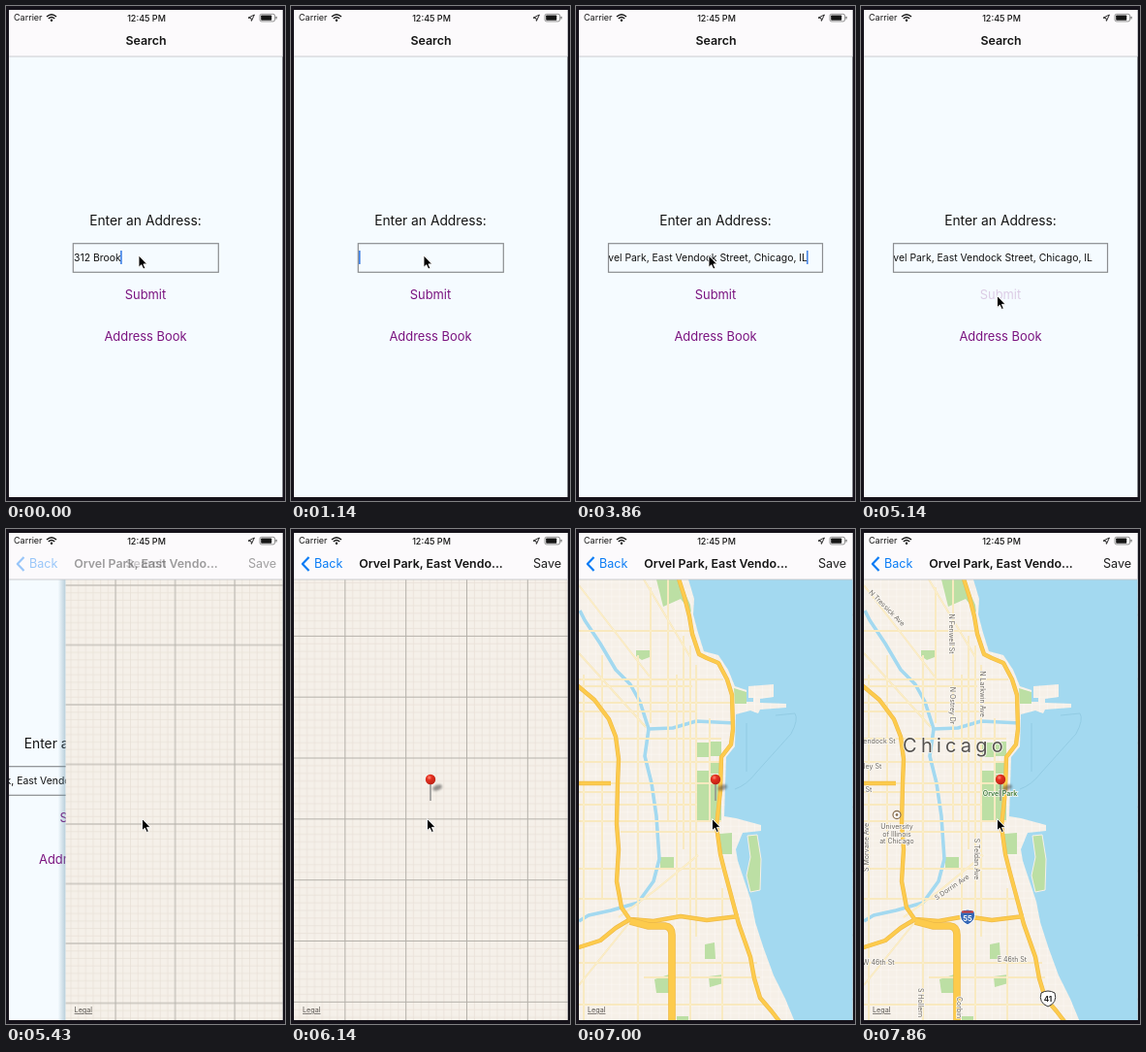
Animation of 288 by 510 pixels, one loop 8000 ms. Source, as an HTML page:

```html
<!DOCTYPE html>
<html lang="en">
<head>
<meta charset="utf-8">
<title>Address search</title>
<style>
html, body { margin: 0; width: 100%; height: 100%; overflow: hidden; background: #15121a; }
svg { display: block; width: 100%; height: 100%; font-family: Inter, Roboto, sans-serif; }
text { white-space: pre; }
path { fill: none; stroke-linejoin: round; }
.mid { text-anchor: middle; }
.title { font-size: 12.4px; font-weight: 600; fill: #141414; }
.bar { font-size: 12.6px; }
.link { font-size: 12.9px; fill: #7b1480; }
.field { font-size: 10.4px; fill: #111; }
.land { fill: #f6f0e8; }
.park { fill: #bcdfa4; }
.river { stroke: #a3d9f0; stroke-width: 3.6; }
.edge { stroke: #f5e3b4; stroke-width: 1.9; }
.street { stroke: #fdf0cc; stroke-width: 1.1; }
.casing { stroke: #eeba48; stroke-width: 4.4; }
.highway { stroke: #fdcb4c; stroke-width: 3.2; }
.wide.casing { stroke-width: 7.6; }
.wide.highway { stroke-width: 6.2; }
.label { font-size: 7px; fill: #6c6862; paint-order: stroke; stroke: #fbf8f3; stroke-width: 1.6px; text-anchor: middle; }
</style>
</head>
<body>
<svg viewBox="0 0 288 510" preserveAspectRatio="none">
  <defs>
    <clipPath id="screen"><rect x="3" y="4" width="282.5" height="502"/></clipPath>
    <clipPath id="fieldClip"><rect x="34" y="240" width="220" height="40"/></clipPath>
    <clipPath id="landClip"><use href="#coast"/></clipPath>
    <pattern id="grid" width="64" height="64" patternUnits="userSpaceOnUse">
      <rect width="64" height="64" fill="#f5f0e9"/>
      <path id="fine" stroke="#e8e0d7" stroke-width=".8"/>
      <path d="M32 0V64M0 32H64" stroke="#b3afa9"/>
    </pattern>
    <pattern id="blocks" width="8.2" height="7.4" patternUnits="userSpaceOnUse">
      <path d="M0 3H8.2M4 0V7.4" stroke="#fffdfa" stroke-width=".7" opacity=".5"/>
    </pattern>
    <linearGradient id="shade">
      <stop offset="0" stop-color="#5a88a0" stop-opacity="0"/>
      <stop offset="1" stop-color="#5a88a0" stop-opacity=".4"/>
    </linearGradient>
    <radialGradient id="red" cx=".38" cy=".32" r=".7">
      <stop offset="0" stop-color="#ff8a78"/><stop offset=".35" stop-color="#e5301f"/><stop offset="1" stop-color="#bb2015"/>
    </radialGradient>
    <filter id="soft" x="-50%" y="-50%" width="200%" height="200%"><feGaussianBlur stdDeviation="1.1"/></filter>
  </defs>

  <g clip-path="url(#screen)">
    <rect width="288" height="510" fill="#f5fbff"/>

    <g id="form">
      <text class="mid" x="144" y="226" font-size="13.8" fill="#141414">Enter an Address:</text>
      <rect id="box" y="244.7" height="29.6" fill="none" stroke="#8b8d90" stroke-width="1.2"/>
      <g clip-path="url(#fieldClip)"><text id="entry" class="field" y="263"></text></g>
      <rect id="caret" y="252" width="1.6" height="14" fill="#3c7fe6"/>
      <text id="submit" class="link mid" x="144" y="301.5">Submit</text>
      <text class="link mid" x="144" y="345">Address Book</text>
    </g>

    <g id="page">
      <rect x="-5" y="52" width="8" height="456" fill="url(#shade)"/>
      <rect x="3" y="52" width="283" height="456" fill="url(#grid)"/>
      <g id="map">
        <rect x="3" y="52" width="283" height="456" fill="#a3d9f0"/>
        <path d="M164 268Q176 264 186 251L222 211Q230 196 226 190L206 192M176 200V250" stroke="#8fc8e0" stroke-width=".8"/>
        <path id="coast" class="land" d="M3 52H116L122 72L121 88L126 107L132 126L147 130L157 145L164 162L176 166V178H183V174H178V162L204 160V173L190 175V179L217 180V184L190 186L188 190L180 187L165 191L164 224L155 235L153 296L165 298L191 305V311L172 313L165 330L167 342L172 357L181 384L185 405L193 430L204 460L216 484L226 508H3Z"/>
        <path class="park" stroke="#f6f0e8" d="M177 316L187 315L191 340L190 372L180 374L176 357L180 338Z"/>
        <g clip-path="url(#landClip)">
          <rect x="3" y="52" width="226" height="456" fill="url(#blocks)"/>
          <path class="park" d="M83 52H106L118 78L119 86L108 72L90 80ZM62 125H76V132L68 135L62 131ZM125 220H137V235H125ZM139 219H150V234H139ZM125 249H137V301H125ZM139 241H148V252H139ZM139 253H150V300H139ZM148 314L161 313V335H150ZM87 338H101V350H87ZM133 428L143 426L144 443H133ZM137 461L152 459V468L138 472ZM81 464L96 459V478H83ZM163 164L176 168V180H164ZM104 502H116V508H104Z"/>
          <path class="river" d="M4 84L9 94L25 118L41 145L56 160L66 178L75 206L100 205L124 198L164 200M75 206L71 234L78 262L83 296L86 340L80 363L64 385L36 393L13 398L3 404"/>
          <g id="streets"></g>
          <g id="roads"></g>
          <g id="trunk"></g>
        </g>
        <g id="labels"></g>
      </g>
      <text x="12" y="498" font-size="7.2" fill="#55524e" text-decoration="underline">Legal</text>
      <g id="pin">
        <ellipse cx="151" cy="266.5" rx="5" ry="2.8" fill="#444" opacity=".55" transform="rotate(-22 151 266)" filter="url(#soft)"/>
        <path d="M144 262V280" stroke="#8a8a8a" stroke-width="1.4"/>
        <circle cx="144" cy="258" r="5.2" fill="url(#red)"/>
      </g>
    </g>

    <rect width="288" height="52" fill="#fcfafc"/>
    <path d="M0 52H288" stroke="#c4c6c9" stroke-width=".9"/>
    <g fill="#151515" font-size="9">
      <text x="8" y="15.3">Carrier</text>
      <text class="mid" x="145" y="15.5" font-weight="500">12:45 PM</text>
      <path d="M42 11Q47 6.4 52 11M43.8 13Q47 10 50.2 13" stroke="#151515" stroke-width="1.5"/>
      <circle cx="47" cy="14.7" r="1.2"/>
      <path d="M250 12.2L256.4 9L253.4 15.4L253 12.4Z" stroke="#151515" stroke-width=".9"/>
      <rect x="262" y="8.3" width="15.6" height="7.6" rx="1.8" fill="none" stroke="#777" stroke-width=".8"/>
      <rect x="263.2" y="9.5" width="11" height="5.2" rx=".7"/>
      <rect x="278.4" y="10.7" width="1.2" height="2.8" rx=".5" fill="#777"/>
    </g>
    <text id="oldTitle" class="title mid" x="144.5" y="40">Search</text>
    <g id="newBar">
      <path d="M18.5 29L11.8 36L18.5 43" stroke="#0a7cf5" stroke-width="2.2"/>
      <text class="bar" x="24" y="40.3" fill="#0a7cf5">Back</text>
      <text class="title mid" x="144.5" y="40">Orvel Park, East Vendo...</text>
      <text class="bar" x="250" y="40.3" fill="#1c1c1c">Save</text>
    </g>
  </g>
  <path id="mouse" d="M0 0V12.2L2.8 9.7L4.8 14L6.8 13.1L4.9 8.9H8.6Z" style="fill:#000" stroke="#fff" stroke-width=".9"/>
</svg>

<script>
const $ = id => document.getElementById(id);
const set = (id, attrs) => { for (const k in attrs) $(id).setAttribute(k, attrs[k]); };
const ramp = (t, from, to) => Math.min(1, Math.max(0, (t - from) / (to - from)));
const smooth = x => x * x * (3 - 2 * x);
const mix = (a, b, p) => a + (b - a) * p;

const LOOP = 8000, PASTE = 1860, TAP = 4860, PUSH = 5235;
const typed = "312 Brook";
const address = "Orvel Park, East Vendock Street, Chicago, IL";

// Map roads: casing below, lighter line above
const layered = (id, d, outer, inner) => {
  $(id).innerHTML = `<path class="${outer}" d="${d}"/><path class="${inner}" d="${d}"/>`;
};
layered("streets",
  "M3 105H122M3 155H152M3 162H120M3 179H160M3 188H125M3 216H150M3 240H150M3 271H125M3 284H125M3 301H150" +
  "M3 262H148M46 312H148M3 350H150M3 381H160M3 447H187M70 462H190M3 490H196" +
  "M8 150V508M27 130V380M64 130V508M77 60V200M95 52V300M104 150V400M111 110V330M118 120V508M124 140V420M138 195V300M151 370V508" +
  "M3 58L76 152M3 128L72 204M44 400L82 372L126 336M58 402L3 470M70 52L118 132",
  "edge", "street");
layered("roads",
  "M105 48L112 70L117 90L120 108L127 129L135 133L147 138L156 155L161 171L162 206L160 222L150 235L149 270L145 306L149 335L153 351L160 377L168 407L180 441L184 463L190 483L202 497L212 510" +
  "M0 160L19 176L34 196L41 214L44 237L43 262L42 304L44 330L42 363L47 390L56 403" +
  "M0 432L25 424L41 411L56 402L80 404L108 399L135 403L168 399M3 262H36",
  "casing", "highway");
layered("trunk", "M56 404L75 409H92Q99 410 99 418V510", "wide casing", "wide highway");

const fine = [];
for (let i = 0; i <= 64; i += 8) fine.push(`M${i} 0V64M0 ${i}H64`);
set("fine", { d: fine.join("") });

const labels = [
  ["N Tressick Ave", 25, 83, 45], ["N Fenwell St", 91, 108, 90], ["N Ostrey Dr", 92, 182, 90],
  ["N Larkwin Ave", 123, 170, 90], ["endock St", 19, 221, 0], ["ley St", 12, 247, 0], ["St", 8, 271, 0],
  ["S Morvane Ave", 8, 328, -90], ["S Teldan Ave", 117, 340, 90], ["S Dorrin Ave", 95, 371, -34],
  ["W 46th St", 18, 449, 0], ["E 46th St", 156, 446, 0], ["S Hollern", 59, 488, 90], ["Corbin", 99, 493, 90],
  ["University", 37, 309, 0], ["of Illinois", 37, 316.5, 0], ["at Chicago", 37, 324, 0]
];
$("labels").innerHTML = labels.map(([s, x, y, r]) =>
  `<text class="label" transform="translate(${x} ${y}) rotate(${r})">${s}</text>`).join("") + `
  <text class="label" x="97" y="230" style="font-size:20px;letter-spacing:4.2px;fill:#55524f">Chicago</text>
  <text class="label" x="143.5" y="274.5" style="font-weight:600;fill:#3c7a39">Orvel Park</text>
  <circle cx="37" cy="294.5" r="4" fill="#fff" stroke="#8d7456" stroke-width="1.3"/>
  <circle cx="37" cy="294.5" r="1.4" fill="#8d7456"/>
  <path d="M103 394Q110 390 117 394Q120 403 110 408Q100 403 103 394Z" style="fill:#3567b5" stroke="#fff"/>
  <path d="M104 394.5H116" stroke="#d2423c" stroke-width="2"/>
  <text class="mid" x="110" y="404" font-size="7.6" font-weight="700" fill="#fff">55</text>
  <path d="M186 478Q193 474 200 478Q203 488 193 492Q183 488 186 478Z" style="fill:#fff" stroke="#333"/>
  <text class="mid" x="193" y="487" font-size="8" font-weight="700" fill="#222">41</text>`;

function drawField(t) {
  const pasted = t >= PASTE;
  const left = Math.max(0, typed.length - Math.floor(t / 126));
  $("entry").textContent = pasted ? address : typed.slice(0, left);
  set("entry", { x: pasted ? 239 : 70, "text-anchor": pasted ? "end" : "start" });
  set("box", pasted ? { x: 33.5, width: 221 } : { x: 69.3, width: 150 });

  let blink = 1;
  if (t >= TAP) blink = 0;
  else if (t > 2400) {
    const b = (t - 2400) % 1000;
    blink = 1 - ramp(b, 450, 600) + ramp(b, 850, 1000);
  } else if (!pasted) blink = 1 - ramp(t, 1360, 1570);
  const end = pasted ? 238 : 70 + (left ? $("entry").getComputedTextLength() - .5 : 0);
  set("caret", { x: end, opacity: blink });
}

function draw(t) {
  drawField(t);
  set("submit", { opacity: 1 - .8 * (ramp(t, TAP, TAP + 150) - ramp(t, 5200, 5400)) });

  const push = 1 - (1 - ramp(t, PUSH, PUSH + 480)) ** 3;
  set("form", { transform: `translate(${-85 * push} 0)` });
  set("page", { transform: `translate(${283 * (1 - push)} 0)`, visibility: push ? "visible" : "hidden" });
  set("oldTitle", { opacity: 1 - push });
  set("newBar", { opacity: ramp(push, .65, 1) });

  const zoom = smooth(ramp(t, 5900, 6570));
  const k = mix(61.5, 66, zoom) / 64;
  const gx = mix(116, 125, zoom) - 32 * k, gy = mix(304, 286.5, zoom) - 32 * k;
  set("grid", { patternTransform: `translate(${gx} ${gy}) scale(${k})` });

  set("pin", { opacity: t >= 6000 ? 1 : 0 });
  set("map", { visibility: t >= 7000 ? "inherit" : "hidden" });
  set("labels", { opacity: ramp(t, 7060, 7430) });

  const move = smooth(ramp(t, 3900, 4600));
  set("mouse", { transform: `translate(${mix(137, 140.5, move)} ${mix(257, 298.5, move)})` });
}

function tick() {
  draw(performance.now() % LOOP);
  requestAnimationFrame(tick);
}
tick();
</script>
</body>
</html>
```
